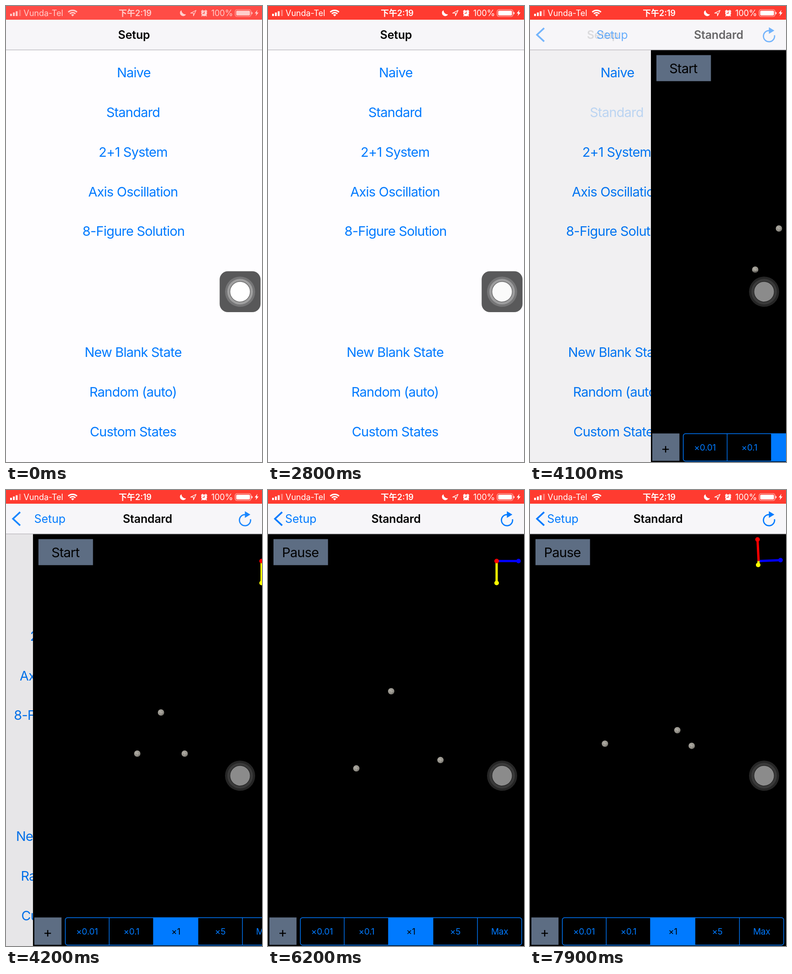
An HTML page that plays this animation: 561x998 px, repeating every 8 s.

```html
<!DOCTYPE html>
<html lang="en">
<head>
<meta charset="utf-8">
<title>Three bodies</title>
<style>
  html, body { margin: 0; width: 100%; height: 100%; overflow: hidden; background: #fefdff; }
  svg { display: block; width: 100vw; height: 100vh; }
  text {
    font-family: Inter, "Noto Sans CJK SC", "Noto Sans CJK", "Noto Sans", sans-serif;
    font-optical-sizing: none;
    text-anchor: middle;
  }
  .big { font-size: 29px; letter-spacing: -.78px; }
  .link { fill: #007aff; }
  .title { font-size: 25px; font-weight: 600; letter-spacing: -.2px; }
  .back { font-size: 25px; fill: #007aff; text-anchor: start; }
  .seg { font-size: 19px; letter-spacing: -.2px; fill: #007aff; }
  .small { font-size: 18px; }
  .line { fill: none; stroke: #007aff; }
</style>
</head>
<body>
<svg viewBox="0 0 561 998" preserveAspectRatio="none">
  <defs>
    <radialGradient id="rock" cx=".42" cy=".38" r=".65">
      <stop offset="0" stop-color="#b4b1a9"/>
      <stop offset=".65" stop-color="#98958d"/>
      <stop offset="1" stop-color="#6b6963"/>
    </radialGradient>
    <g id="body">
      <circle r="7" fill="url(#rock)"/>
      <g fill="#77746e" opacity=".6">
        <circle cx="-2.5" cy="1.5" r="1.2"/>
        <circle cx="2" cy="-2.5" r="1"/>
        <circle cx="2.5" cy="3" r="1.3"/>
        <circle cx="-1" cy="-4" r=".8"/>
      </g>
    </g>
  </defs>

  <rect width="561" height="998" fill="#fefdff"/>
  <g id="list"></g>
  <rect id="dim" y="96" width="561" height="902" opacity="0"/>

  <g id="scene">
    <rect y="96" width="561" height="902"/>
    <g id="bodies"></g>
    <g id="axes"></g>
    <rect x="12" y="107.5" width="119.5" height="57" fill="#5d6d83"/>
    <text id="run" class="big" x="71" y="147">Start</text>
    <rect x="3" y="935.5" width="59.5" height="60" fill="#5d6d83"/>
    <text x="32.3" y="978.5" font-size="30">+</text>
    <rect x="264" y="936" width="97.5" height="60" fill="#007aff"/>
    <rect class="line" x="70.8" y="936" width="485.2" height="60" rx="5" stroke-width="1.5"/>
    <path class="line" d="M167 936v60M264 936v60M361.5 936v60M459 936v60" stroke-width="1.4"/>
    <g id="speeds"></g>
  </g>

  <rect y="30" width="561" height="66" fill="#f7f6f9"/>
  <rect y="95.5" width="561" height="1.2" fill="#b4b3b7"/>
  <text id="setup" class="title" x="280.5" y="72">Setup</text>
  <text id="standard" class="title" x="280.5" y="72">Standard</text>
  <text id="back" class="back" x="37.5" y="72">Setup</text>
  <g id="icons">
    <path class="line" d="M31 48.3L15.3 63L31 77.7" stroke-width="3.7"/>
    <path class="line" d="M524 53.8A12.2 12.2 0 1 0 535.8 64" stroke-width="2.7"/>
    <path d="M523.5 46.5L535.5 53.7L523.5 61Z" fill="#007aff"/>
  </g>

  <rect id="bar" width="561" height="30" fill="#ff3b30"/>
  <g id="status" fill="#fff">
    <path d="M9 17h4v5h-4zM15.2 14.3h4V22h-4zM21.4 11.4h4V22h-4z"/>
    <path d="M28.5 8.5h4V22h-4z" opacity=".35"/>
    <text class="small" x="38.5" y="22" style="text-anchor:start">Vunda-Tel</text>
    <g fill="none" stroke="#fff" stroke-width="2.9">
      <path d="M136.4 13.4A13.6 13.6 0 0 1 155.6 13.4"/>
      <path d="M139.9 17A8.6 8.6 0 0 1 152.1 17"/>
    </g>
    <path d="M146 22.8L142.6 19.3A4.8 4.8 0 0 1 149.4 19.3Z"/>
    <text class="small" x="283" y="22" font-weight="600">下午2:19</text>
    <path d="M384.5 9.2A7 7 0 1 0 394.5 18.2A9 9 0 0 1 384.5 9.2Z"/>
    <path d="M416.5 9.5L410.8 21.5V15.6H404.6Z" fill="none" stroke="#fff" stroke-width="1.4" stroke-linejoin="round"/>
    <circle cx="434.2" cy="16" r="6.3"/>
    <path d="M427.8 12.2L431.4 8.8M437 8.8L440.6 12.2M430 20.5L428.6 22.4M438.4 20.5L439.8 22.4" stroke="#fff" stroke-width="2"/>
    <path d="M434.4 12V16.4H430.6" fill="none" stroke="#ff3b30" stroke-width="1.4"/>
    <text class="small" x="473.5" y="22">100%</text>
    <rect x="502.2" y="8" width="34.6" height="15" rx="4" fill="none" stroke="#fff" stroke-width="1.2" stroke-opacity=".75"/>
    <rect x="504.4" y="10.2" width="30.2" height="10.6" rx="2"/>
    <path d="M538.4 13A3 3 0 0 1 538.4 18.2Z" stroke="#fff" stroke-width=".8"/>
    <path d="M551 8.6L545 16.2H548.6L547.2 22L553.4 14.2H549.6Z"/>
  </g>

  <g transform="translate(513 625.3)" fill="#fff">
    <rect id="pad" x="-44.8" y="-44.8" width="89.6" height="89.6" rx="18" fill="#000"/>
    <circle id="outer" r="33"/>
    <circle id="middle" r="28"/>
    <circle id="knob" r="21.7"/>
    <circle r="22.3" fill="none" stroke="#000" stroke-opacity=".35" stroke-width="1.3"/>
  </g>
</svg>
<script>
const LOOP = 8000, STEP = 100;
const PUSH = 4050, LAUNCH = 5375;
const ORBIT = { x: 280.5, y: 547, near: 60, ecc: 0.384, rate: 1.768 / 1000 };
const HUB = { x: 501, y: 155.5, len: 48 };
const RAD = Math.PI / 180;

const $ = id => document.getElementById(id);
const clamp = v => Math.max(0, Math.min(1, v));
const mix = (a, b, k) => a + (b - a) * k;
const smooth = k => k * k * (3 - 2 * k);

function add(parent, tag, attrs, label) {
  const el = document.createElementNS("http://www.w3.org/2000/svg", tag);
  set(el, attrs);
  if (label) el.textContent = label;
  return $(parent).appendChild(el);
}
function set(el, attrs) {
  for (const key in attrs) el.setAttribute(key, attrs[key]);
}

const rows = [
  ["Naive", 156, 280], ["Standard", 243], ["2+1 System", 329.7], ["Axis Oscillation", 416.5],
  ["8-Figure Solution", 503.3, 279.5], ["New Blank State", 768], ["Random (auto)", 855], ["Custom States", 941.7]
].map(([label, y, x = 278.5]) => add("list", "text", { class: "big link", x, y }, label));

["×0.01", "×0.1", "×1", "×5", "Max"].forEach((label, i) => {
  const seg = add("speeds", "text", { class: "seg", x: 118.5 + 97.3 * i, y: 973 }, label);
  if (i === 2) seg.style.fill = "#000";
});

const bodies = [-90, 30, 150].map(angle => ({
  angle, el: add("bodies", "use", { href: "#body" })
}));

const axes = ["#00f", "#ff0", "#f00"].map(color => {
  const g = add("axes", "g", { fill: color, stroke: color });
  return {
    g,
    line: g.appendChild(add("axes", "line", { x1: HUB.x, y1: HUB.y, "stroke-width": 5 })),
    dot: g.appendChild(add("axes", "circle", { r: 5, stroke: "none" }))
  };
});

// Polar position on an ellipse, starting at the nearest point.
function kepler(ms) {
  const { near, ecc, rate } = ORBIT;
  const mean = Math.max(0, ms) * rate;
  let e = mean;
  for (let i = 0; i < 8; i++) e -= (e - ecc * Math.sin(e) - mean) / (1 - ecc * Math.cos(e));
  const turn = Math.atan2(Math.sqrt(1 - ecc * ecc) * Math.sin(e), Math.cos(e) - ecc);
  return { r: near / (1 - ecc) * (1 - ecc * Math.cos(e)), turn };
}

// Screen directions of the x, y and z axes for a camera tilt of 0 to 1.
function camera(k) {
  const tilt = 79.8 * RAD * k;
  return [
    [1, -0.04 * k],
    [-0.02 * k, Math.cos(tilt)],
    [-0.05 * k, -Math.sin(tilt)]
  ];
}

function drawStatus(t) {
  const k = clamp(t / 200);
  set($("bar"), { fill: `rgb(255,${mix(76, 59, k)},${mix(70, 48, k)})` });
  set($("status"), { opacity: mix(0.72, 1, k) });
}

function drawTouch(t) {
  const k = clamp((t - 2750) / 550);
  set($("pad"), { opacity: mix(0.65, 0.31, k * k) });
  set($("outer"), { opacity: mix(0.18, 0.15, k) });
  set($("middle"), { opacity: mix(0.3, 0.09, k) });
  set($("knob"), { opacity: mix(1, 0.41, k) });
}

function drawPush(t) {
  const left = t < PUSH ? 1 : t >= 4600 ? 0 : Math.exp(-0.015 * (t - PUSH));
  const p = 1 - left;
  set($("list"), { transform: `translate(${-168 * p})` });
  set($("dim"), { opacity: 0.1 * p });
  set($("scene"), { transform: `translate(${561 * left})` });
  set($("setup"), { transform: `translate(${-229 * p})`, opacity: left ** 3 });
  set($("standard"), { transform: `translate(${281 * left})`, opacity: clamp(p * 1.1) });
  set($("back"), { transform: `translate(${229 * left})`, opacity: clamp(p * 1.1) });
  set($("icons"), { opacity: p });
  rows[1].setAttribute("opacity", t >= 3900 ? 0.22 : 1);
}

function drawScene(t) {
  const k = smooth(clamp((t - 6400) / 1500));
  const dirs = camera(k);
  const { r, turn } = kepler(t - LAUNCH);
  for (const { angle, el } of bodies) {
    const a = angle * RAD - turn;
    const u = r * Math.cos(a), v = r * Math.sin(a);
    const x = ORBIT.x + u * dirs[0][0] + v * dirs[1][0];
    const y = ORBIT.y + u * dirs[0][1] + v * dirs[1][1];
    set(el, { transform: `translate(${x} ${y})` });
  }
  axes.forEach(({ line, dot }, i) => {
    const x = HUB.x + HUB.len * dirs[i][0], y = HUB.y + HUB.len * dirs[i][1];
    set(line, { x2: x, y2: y });
    set(dot, { cx: x, cy: y });
  });
  $("axes").append(axes[k > 0.56 ? 1 : 2].g);
  $("run").textContent = t >= 5400 ? "Pause" : "Start";
}

function draw(t) {
  drawStatus(t);
  drawTouch(t);
  drawPush(t);
  drawScene(t);
}

const begin = performance.now();
function tick() {
  const t = (performance.now() - begin) % LOOP;
  draw(Math.floor(t / STEP) * STEP);
  requestAnimationFrame(tick);
}
tick();
</script>
</body>
</html>
```
